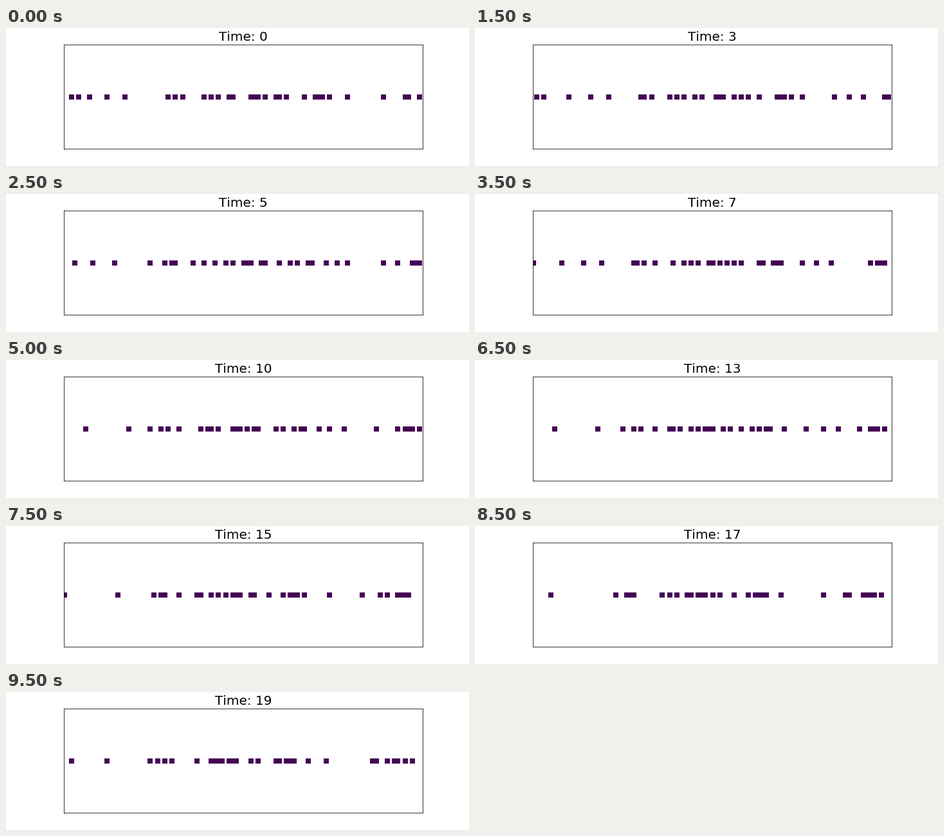
A matplotlib script that plays this animation: 720x216 px, repeating every 10 s.

```python
import matplotlib.pyplot as plt
import numpy as np
from matplotlib.animation import FuncAnimation
from matplotlib.transforms import ScaledTranslation

CELLS, STEPS, STEP_MS = 100, 20, 500
TOP_SPEED, BRAKE_CHANCE = 5, 0.5
DPI = 72
START = [2, 4, 7, 12, 17, 29, 31, 33, 39, 41, 43, 46, 47, 52, 53,
         54, 56, 59, 60, 62, 67, 70, 71, 72, 74, 79, 89, 95, 96, 99]


def simulate():
    """Nagel-Schreckenberg traffic on a ring road: one row of cells per step."""
    rng = np.random.default_rng(4)
    road = np.array(START)
    speed = rng.integers(0, TOP_SPEED, len(road))
    history = [road]
    for _ in range(STEPS - 1):
        gap = (np.roll(road, -1) - road) % CELLS - 1
        speed = np.minimum(np.minimum(speed + 1, TOP_SPEED), gap)
        braking = rng.random(len(road)) < BRAKE_CHANCE
        speed = np.maximum(speed - braking, 0)
        road = (road + speed) % CELLS
        history.append(road)
    return history


history = simulate()

plt.rcParams["font.family"] = "DejaVu Sans"
plt.rcParams["text.kerning_factor"] = 6
fig, ax = plt.subplots(figsize=(720 / DPI, 216 / DPI), dpi=DPI)
fig.subplots_adjust(left=0.125, right=0.9, bottom=0.125, top=0.88)
ax.set(xlim=(0, CELLS), ylim=(-1, 1), xticks=[], yticks=[])

# Half a pixel right and down keeps the squares on whole pixels
half_pixel = ScaledTranslation(0.5 / DPI, -0.5 / DPI, fig.dpi_scale_trans)
cars, = ax.plot(START, np.zeros(len(START)), "s", color="#440154",
                markersize=8, markeredgewidth=0,
                transform=ax.transData + half_pixel)
title = ax.set_title("Time: 0", fontsize=20, pad=6)


def draw(step):
    cars.set_xdata(history[step])
    title.set_text(f"Time: {step}")
    return cars, title


anim = FuncAnimation(fig, draw, frames=STEPS, interval=STEP_MS,
                     repeat=True, repeat_delay=0)
plt.show()
```
